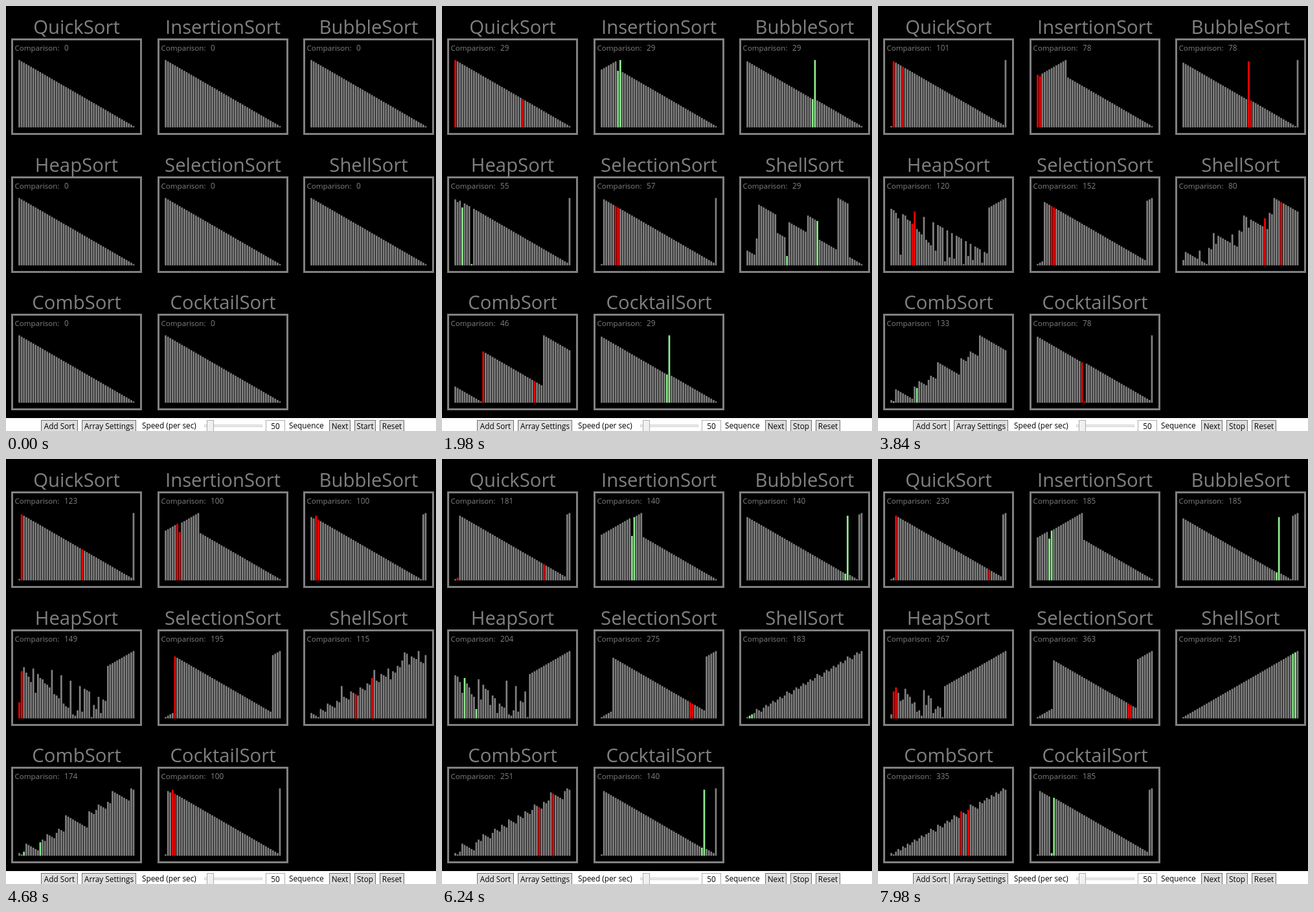
An HTML page with a canvas that plays this animation: 664 by 656 pixels, repeating every 8000 ms.

```html
<!DOCTYPE html>
<html lang="en">
<head>
<meta charset="utf-8">
<title>Sorting comparison</title>
<style>
  html, body { margin: 0; width: 100%; height: 100%; overflow: hidden; background: #000; }
  canvas { display: block; }
</style>
</head>
<body>
<canvas id="stage" width="664" height="656"></canvas>
<script>
const ctx = document.getElementById('stage').getContext('2d');
const SIZE = 50, LOOP = 8000, FRAME = 60, START = 720;
const GRAY = '#808080', RED = '#ff0000', GREEN = '#90ee90';
const FONT = '"Open Sans", "Noto Sans", sans-serif';

// Each algorithm works on t: compare() and swap() take one tick each.
const sorts = {
  QuickSort(t) {
    (function quick(lo, hi) {
      if (lo >= hi) return;
      let mid = lo;
      for (let j = lo + 1; j <= hi; j++) if (t.compare(lo, j) > 0) t.swap(++mid, j);
      t.swap(lo, mid);
      quick(lo, mid - 1);
      quick(mid + 1, hi);
    })(0, SIZE - 1);
  },
  InsertionSort(t) { gapInsertion(t, 0, 1); },
  BubbleSort(t) {
    for (let end = SIZE - 1; end > 0; end--)
      for (let j = 0; j < end; j++) t.order(j, j + 1);
  },
  HeapSort(t) {
    function sift(root, size) {
      let top = root;
      for (const child of [2 * root + 1, 2 * root + 2])
        if (child < size && t.compare(top, child) < 0) top = child;
      if (top !== root) { t.swap(root, top); sift(top, size); }
    }
    for (let i = SIZE / 2 - 1; i >= 0; i--) sift(i, SIZE);
    for (let end = SIZE - 1; end > 0; end--) { t.exchange(0, end); sift(0, end); }
  },
  SelectionSort(t) {
    for (let i = 0; i < SIZE - 1; i++) {
      let min = i;
      for (let j = i; j < SIZE; j++) if (t.compare(min, j) > 0) min = j;
      t.swap(i, min);
    }
  },
  ShellSort(t) {
    for (const gap of [13, 7, 3, 1])
      for (let first = 0; first < gap; first++) gapInsertion(t, first, gap);
  },
  CombSort(t) {
    for (let g = SIZE / 1.3; g >= 1; g /= 1.3) {
      const gap = Math.floor(g);
      for (let i = 0; i + gap < SIZE; i++) t.order(i, i + gap);
    }
  },
  CocktailSort(t) {
    for (let lo = 0, hi = SIZE - 1; lo < hi;) {
      for (let j = lo; j < hi; j++) t.order(j, j + 1);
      hi--;
      for (let j = hi - 1; j >= lo; j--) t.order(j, j + 1);
      lo++;
    }
  }
};

function gapInsertion(t, first, gap) {
  for (let i = first + gap; i < SIZE; i += gap)
    for (let j = i; j > first && t.order(j - gap, j); j -= gap);
}

// Runs a sort once and keeps the picture after every tick.
function record(sort) {
  const values = Array.from({ length: SIZE }, (_, i) => SIZE - i);
  const steps = [];
  let count = 0, marks = [], color = GRAY;
  const tick = () => steps.push({ values: values.slice(), count, marks, color });
  const t = {
    compare(i, j) {
      count++; marks = [i, j]; color = RED;
      tick();
      return values[i] - values[j];
    },
    exchange(i, j) { [values[i], values[j]] = [values[j], values[i]]; },
    swap(i, j) {
      if (i !== j) { t.exchange(i, j); marks = [i, j]; color = GREEN; }
      tick();
    },
    order(i, j) {
      const wrong = t.compare(i, j) > 0;
      if (wrong) t.swap(i, j);
      return wrong;
    }
  };
  tick();
  sort(t);
  return steps;
}

const panels = Object.entries(sorts).map(([name, sort], i) => ({
  name, steps: record(sort),
  x: Math.round(225.6 * (i % 3)), y: Math.round(212.6 * Math.floor(i / 3))
}));

// Pace of the ticks: [frame, ticks done]
const pace = [[13, 0], [14, 1], [33, 58], [50, 110], [78, 199], [93, 246], [116, 317], [133, 370]];

function ticksAt(frame) {
  if (frame <= pace[0][0]) return 0;
  const k = pace.findIndex(p => frame <= p[0]);
  const [f0, n0] = pace[k - 1], [f1, n1] = pace[k];
  return Math.round(n0 + (n1 - n0) * (frame - f0) / (f1 - f0));
}

function text(str, x, y, size, color, align = 'left') {
  ctx.font = `${size}px ${FONT}`;
  ctx.textAlign = align;
  ctx.fillStyle = color;
  ctx.fillText(str, x, y);
}

function box(x, y, w, h, fill, border) {
  ctx.fillStyle = border;
  ctx.fillRect(x, y, w, h);
  ctx.fillStyle = fill;
  ctx.fillRect(x + 1, y + 1, w - 2, h - 2);
}

function button(label, x, w) {
  box(x, 639, w, 20, '#dddddd', '#707070');
  text(label, x + w / 2, 653, 11.8, '#000', 'center');
}

function drawPanel({ name, steps, x, y }, ticks) {
  const { values, count, marks, color } = steps[Math.min(ticks, steps.length - 1)];
  ctx.save();
  ctx.translate(x, y);
  text(name, 109, 43, 29.3, GRAY, 'center');
  ctx.strokeStyle = GRAY;
  ctx.lineWidth = 3;
  ctx.strokeRect(9.5, 51.5, 199, 146);
  text('Comparison:', 13.5, 69, 11.6, GRAY);
  text(count, 90, 69, 11.8, GRAY);
  values.forEach((v, i) => {
    ctx.fillStyle = marks.includes(i) ? color : GRAY;
    ctx.fillRect(19.2 + 3.6 * i, 187.4 - 2.08 * v, 2.7, 2.08 * v);
  });
  ctx.restore();
}

function drawToolbar(running) {
  ctx.fillStyle = '#fff';
  ctx.fillRect(0, 636, 664, 20);
  button('Add Sort', 54, 57);
  button('Array Settings', 117, 84);
  text('Speed (per sec)', 210, 652, 11.8, '#000');
  box(306, 646, 90, 4, '#e7eaea', '#d6d6d6');
  box(310, 639, 11, 18, '#f0f0f0', '#acacac');
  box(401, 639, 30, 20, '#fff', '#abadb3');
  text('50', 416, 653, 11.8, '#000', 'center');
  text('Sequence', 437, 652, 11.8, '#000');
  button('Next', 499, 33);
  button(running ? 'Stop' : 'Start', 538, 33);
  button('Reset', 577, 38);
}

const began = performance.now();

function draw() {
  const time = Math.max(0, performance.now() - began) % LOOP;
  const ticks = ticksAt(Math.floor(time / FRAME));
  ctx.fillStyle = '#000';
  ctx.fillRect(0, 0, 664, 656);
  panels.forEach(panel => drawPanel(panel, ticks));
  drawToolbar(time >= START);
  requestAnimationFrame(draw);
}
draw();
</script>
</body>
</html>
```
